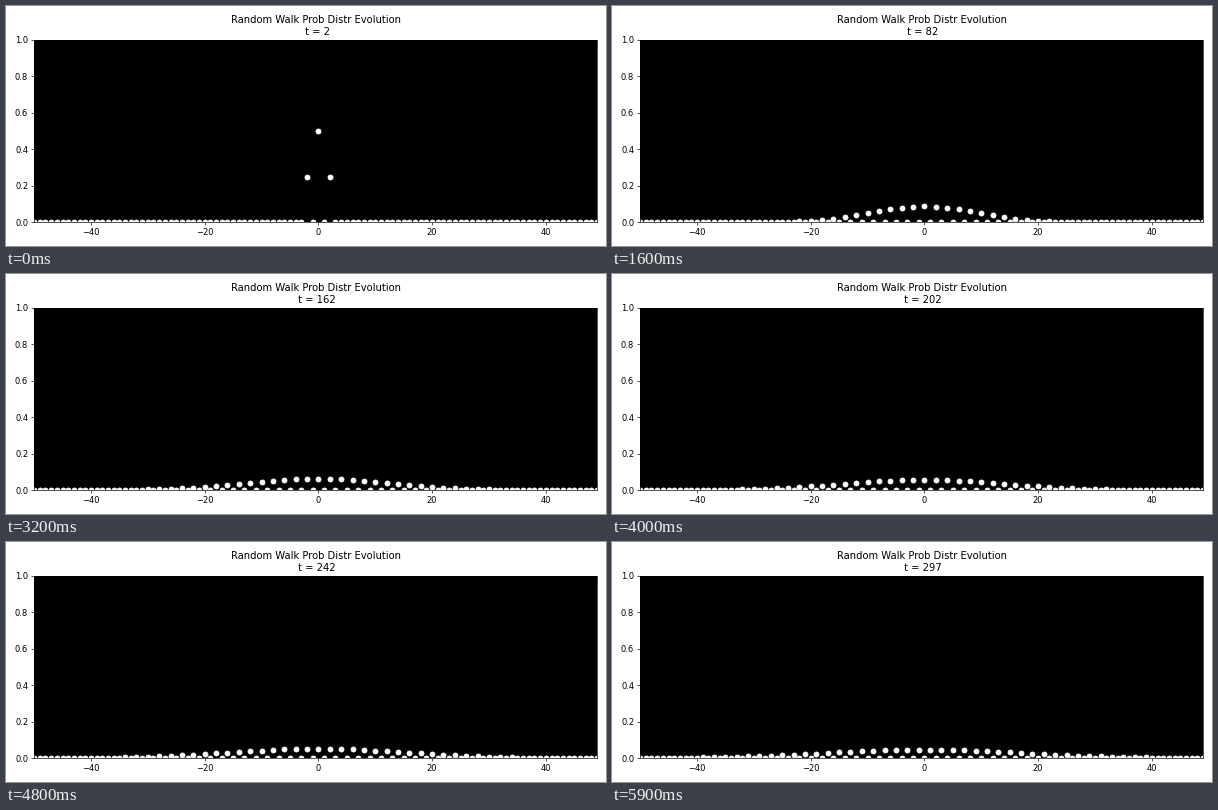
Recreate the animation shown at these times as a matplotlib script. Size 600 by 240 pixels, loop 6000 ms.

```python
import numpy as np
import matplotlib.pyplot as plt
from matplotlib.animation import FuncAnimation

FRAMES = 60
INTERVAL = 100
FIRST_STEP = 2
STEPS_PER_FRAME = 5

sites = np.arange(-50, 50)


def evolve(last_step):
    """Distribution of a symmetric walk on a ring, for every step."""
    prob = (sites == 0).astype(float)
    history = [prob]
    for _ in range(last_step):
        prob = 0.5 * (np.roll(prob, 1) + np.roll(prob, -1))
        history.append(prob)
    return history


def title_text(step):
    return f"Random Walk Prob Distr Evolution\n t = {step}"


history = evolve(FIRST_STEP + STEPS_PER_FRAME * (FRAMES - 1))

plt.rcParams["font.family"] = "DejaVu Sans"
fig, ax = plt.subplots(figsize=(10, 4), dpi=60)
ax.set_facecolor("black")
ax.set_xlim(sites[0], sites[-1])
ax.set_ylim(0, 1)
title = ax.set_title(title_text(FIRST_STEP))
dots, = ax.plot(sites, history[FIRST_STEP], "o", color="white")
fig.tight_layout()


def update(frame):
    step = FIRST_STEP + STEPS_PER_FRAME * frame
    dots.set_ydata(history[step])
    title.set_text(title_text(step))
    return dots, title


anim = FuncAnimation(fig, update, frames=FRAMES, interval=INTERVAL,
                     repeat=True, repeat_delay=0, blit=False)
plt.show()
```
